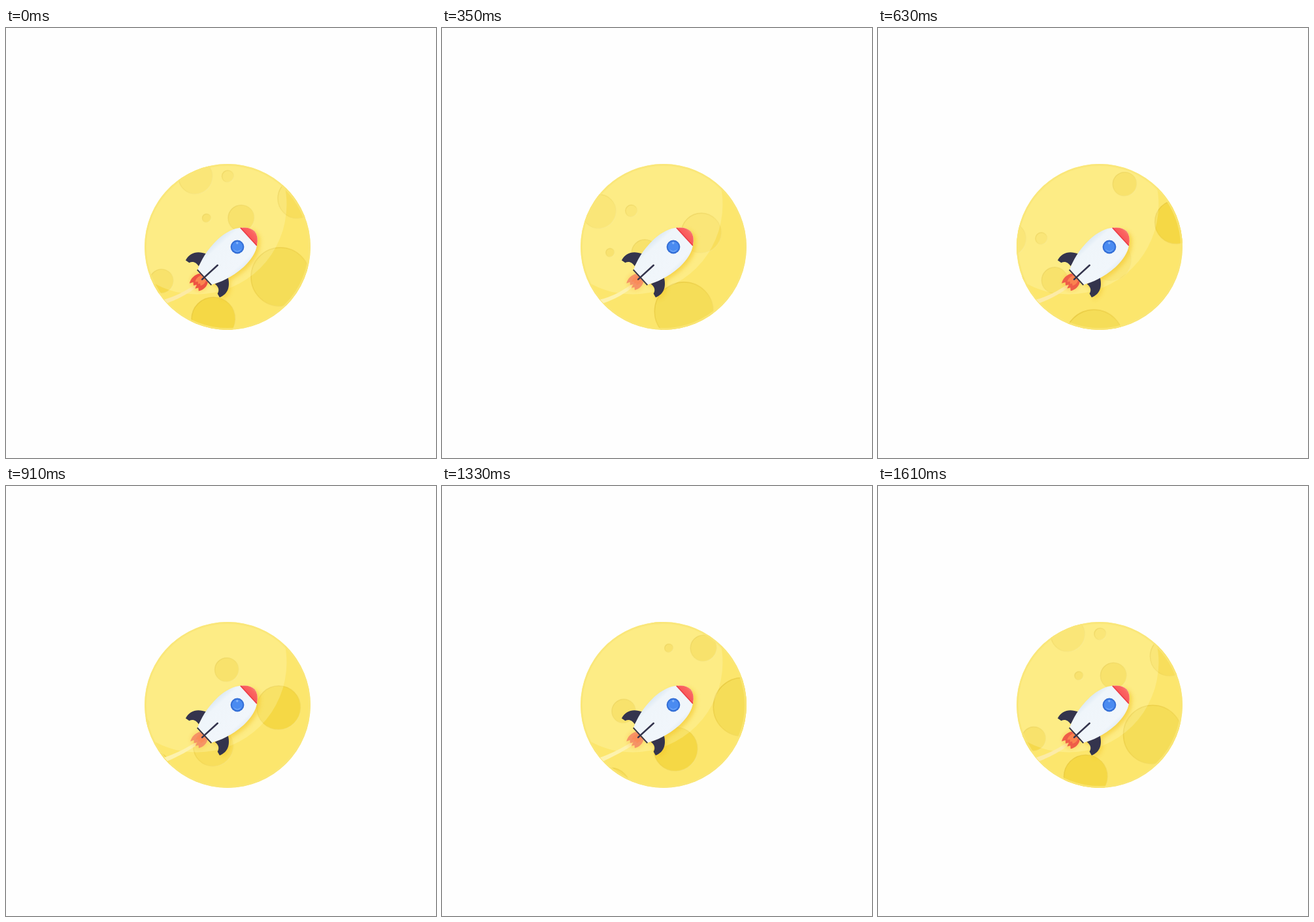
An HTML page for the animation above (1.68 s loop, 658 by 658 pixels).

```html
<!DOCTYPE html>
<html lang="en">
<head>
<meta charset="utf-8">
<title>Rocket over the moon</title>
<style>
html, body { margin: 0; width: 100%; height: 100%; overflow: hidden; background: #fefefe; }
svg { display: block; width: 100vw; height: 100vh; }
</style>
</head>
<body>
<svg viewBox="0 0 658 658">
  <defs>
    <clipPath id="disc"><circle cx="339" cy="335" r="127"/></clipPath>
    <linearGradient id="rim" x1="0" y1="0" x2="1" y2="1">
      <stop offset="0" stop-color="#dcb92c" stop-opacity=".6"/>
      <stop offset=".5" stop-color="#e6c63c" stop-opacity=".35"/>
      <stop offset="1" stop-color="#fff3a0" stop-opacity=".6"/>
    </linearGradient>
    <linearGradient id="hull" x1="0" y1="0" x2="0" y2="1">
      <stop offset="0" stop-color="#dde9f3"/>
      <stop offset=".16" stop-color="#eff5fa"/>
      <stop offset=".88" stop-color="#f1f6fb"/>
      <stop offset="1" stop-color="#e6eef6"/>
    </linearGradient>
    <linearGradient id="nose" x1="0" y1="0" x2="1" y2="0">
      <stop offset="0" stop-color="#f9555a"/>
      <stop offset=".7" stop-color="#fb6661"/>
      <stop offset="1" stop-color="#f58472"/>
    </linearGradient>
    <radialGradient id="halo">
      <stop offset="0" stop-color="#f98a3c" stop-opacity=".75"/>
      <stop offset=".55" stop-color="#fbb04a" stop-opacity=".45"/>
      <stop offset="1" stop-color="#fcd860" stop-opacity="0"/>
    </radialGradient>
    <filter id="blur" x="-30%" y="-30%" width="160%" height="160%">
      <feGaussianBlur stdDeviation="3"/>
    </filter>
    <path id="body" d="M1-16C13-22 30-28.5 55-29C71-29 85-24.5 92-18.5Q104-10 104.5 0Q104 10 92 18.5C85 24.5 71 29 55 29C30 28.5 13 22 1 16Z"/>
    <path id="fin" d="M27-24C20-37 10-43.5-3.5-38.5L-2-32C4-30.5 6.5-25 5-18.5Z"/>
  </defs>

  <g clip-path="url(#disc)">
    <rect x="210" y="206" width="258" height="258" fill="#fce66d"/>
    <g id="craters" stroke="url(#rim)" stroke-width="1.6"></g>
    <circle cx="292" cy="270" r="137.5" fill="#fcfcd0" opacity=".24"/>
    <circle cx="339" cy="335" r="125.6" fill="none" stroke="#fbe779" stroke-width="3" opacity=".8"/>
    <path id="trail" fill="#fdf1ae"/>
  </g>

  <g transform="translate(303.5 381.6) rotate(-42.5)">
    <use href="#body" transform="translate(1 5)" fill="#f3c526" opacity=".6" filter="url(#blur)"/>
    <use href="#fin" transform="translate(0 5) scale(1 -1)" fill="#f3c526" opacity=".45" filter="url(#blur)"/>
    <ellipse id="glow" cx="-10" rx="19" ry="19" fill="url(#halo)"/>
    <g id="flame">
      <path id="outer" d="M-1-9C-7-13.5-17-13-23-8.5L-17.5-6L-20.5-2L-16 .5L-22 3L-17.5 5.5L-20.5 9.5C-14 13.5-6 13-1 9Z"/>
      <path id="inner" d="M-1-5C-6-8-11-7-15-4.5L-11.5-2L-14 1L-11 2.5L-13 5.5C-8 8-4 7-1 5Z" fill="#fb8750"/>
    </g>
    <use href="#fin" fill="#34344d"/>
    <use href="#fin" transform="scale(1 -1)" fill="#34344d"/>
    <use href="#body" fill="url(#hull)"/>
    <path d="M92-18.5Q104-10 104.5 0Q104 10 92 18.5Z" fill="url(#nose)"/>
    <path d="M92-18.5V18.5" stroke="#e93a45" stroke-width="1.5"/>
    <path d="M0-16V16" stroke="#34344d" stroke-width="2"/>
    <path d="M-4.5 0H27.5" stroke="#34344d" stroke-width="2.6" stroke-linecap="round"/>
  </g>

  <circle cx="354" cy="335" r="10.4" fill="#346fd6"/>
  <circle cx="354" cy="335" r="8.3" fill="#4a8bf1"/>
  <path d="M348 338Q354 344.5 360 338Q358 342.5 354 342.5Q350 342.5 348 338Z" fill="#6fa6f7"/>
  <circle cx="353.8" cy="329" r="1.7" fill="#86b5fa"/>
</svg>
<script>
const STEP = 70, STEPS = 24, WRAP = 23.05;
const VX = -9.94, VY = 10.57;

// x, y, radius, fill
const craters = [
  [290, 228, 26.5, '#f8de5c'],
  [339.5, 227, 9.5, '#f8de5c'],
  [307, 291, 7, '#f5d950'],
  [360, 291, 20.5, '#f5d94c'],
  [446.5, 261, 31, '#f8de5c'],
  [420, 381, 45.5, '#f5dd58'],
  [317.5, 445.5, 34, '#f5d845'],
  [238, 387.5, 18.8, '#f5d94c']
];

const $ = id => document.getElementById(id);
const field = $('craters');

for (let lap = -1; lap <= 1; lap++) {
  for (const [x, y, r, fill] of craters) {
    const c = document.createElementNS('http://www.w3.org/2000/svg', 'circle');
    c.setAttribute('cx', x + lap * WRAP * VX);
    c.setAttribute('cy', y + lap * WRAP * VY);
    c.setAttribute('r', r - 0.5);
    c.setAttribute('fill', fill);
    field.appendChild(c);
  }
}

const mix = (a, b, k) => `rgb(${a.map((v, i) => Math.round(v + (b[i] - v) * k))})`;

function draw(ms) {
  const n = Math.floor(ms / STEP) % STEPS;
  field.setAttribute('transform', `translate(${n * VX} ${n * VY})`);

  const heat = 0.5 + 0.5 * Math.cos(n * Math.PI / 4);
  $('outer').setAttribute('fill', mix([246, 158, 108], [238, 82, 66], heat));
  $('inner').setAttribute('opacity', 0.55 + 0.4 * heat);
  $('flame').setAttribute('transform', `scale(${0.94 + 0.06 * heat} ${0.88 + 0.12 * heat})`);
  $('glow').setAttribute('opacity', 0.55 + 0.35 * heat);

  const bend = 1.6 * Math.cos((n - 5) * Math.PI / 12);
  $('trail').setAttribute('d',
    `M290 392Q267 ${408 + bend} 242 415.5L247 421Q270 ${412 + bend} 290 398Z`);
  $('trail').setAttribute('fill', mix([253, 243, 176], [252, 234, 165], heat));
}

function loop() {
  draw(performance.now());
  requestAnimationFrame(loop);
}
loop();
</script>
</body>
</html>
```
